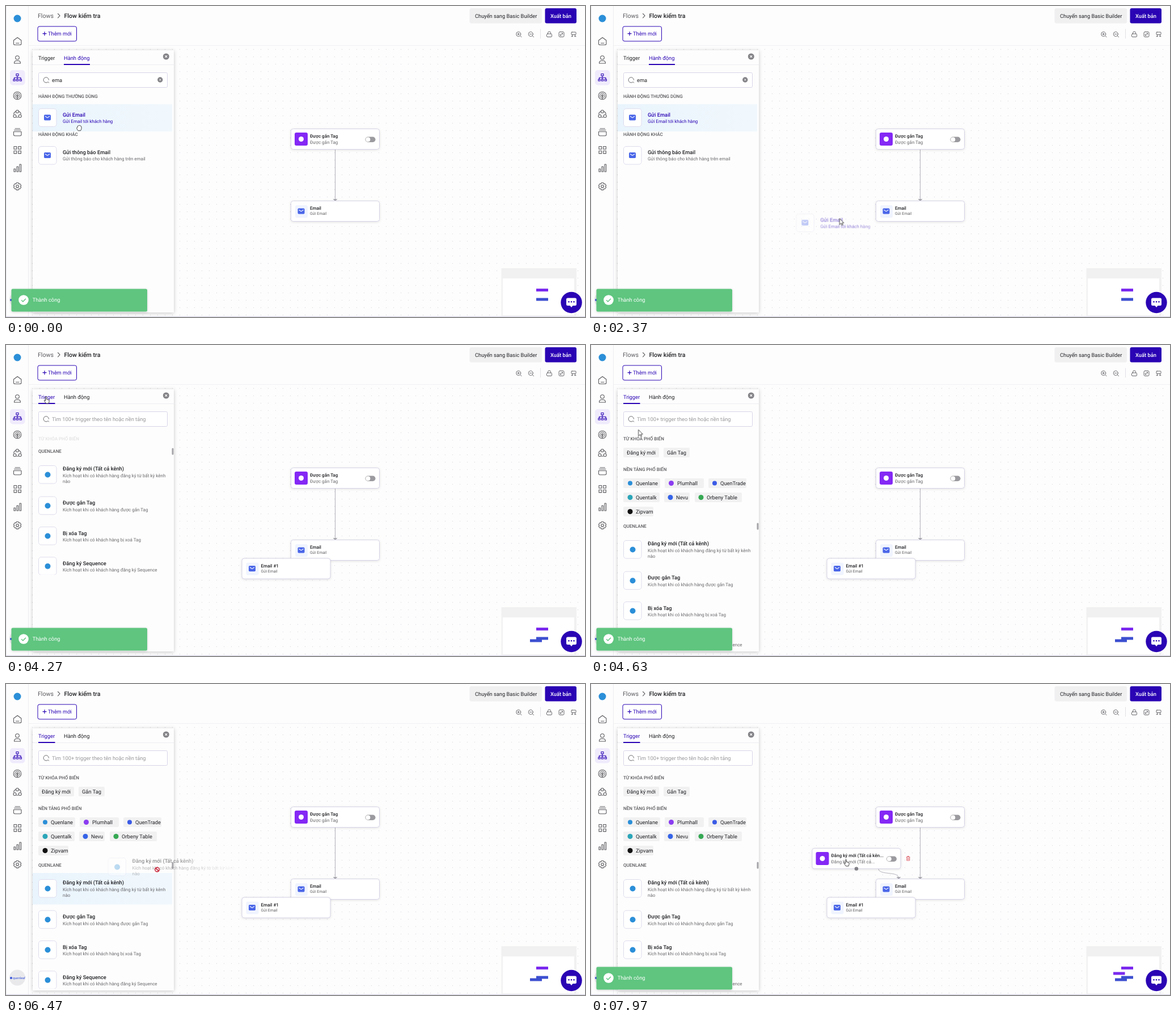
Recreate the animation shown at these times as an HTML page. Size 1021x548 px, loop 8 s.

```html
<!DOCTYPE html>
<html lang="vi">
<head>
<meta charset="utf-8">
<title>Flow builder</title>
<style>
html, body { margin: 0; width: 100%; height: 100%; overflow: hidden; background: #fdfdfd; }
svg { display: block; }
text { font: 9.31px Roboto, "Noto Sans", sans-serif; fill: #202124; text-rendering: geometricPrecision; }
.b { font-weight: 500; }
.s { font-size: 8px; fill: #6a6a6e; }
.xs { font-size: 6.85px; fill: #5c5c60; }
.n { font-size: 8px; font-weight: 500; }
.h { font-size: 8px; font-weight: 500; fill: #58585c; }
.v { fill: #2a04b4; }
.w { fill: #fff; }
.ph { fill: #98989c; }
.line { fill: none; stroke: #5b5b60; stroke-width: 1.1; stroke-linecap: round; stroke-linejoin: round; }
.tool { stroke-width: .9; }
.chip rect { fill: #f1f1f2; rx: 2px; }
.card { fill: #fff; stroke: #d6d4e6; filter: drop-shadow(0 1px 2px #0000001a); }
.edge { fill: none; stroke: #b1b1b9; }

/* hard switches */
.hover-a, .hover-b, .tab-a, .tab-b, .step1, .step2, .drag-a, .drag-b,
.grab, .hand, .arrow, .stop, .tint { animation: 8s step-end infinite; }
.hover-a { animation-name: hover-a; }
.hover-b { animation-name: hover-b; }
.tab-a { animation-name: tab-a; }
.tab-b { animation-name: tab-b; }
.step1 { animation-name: step1; }
.step2 { animation-name: step2; }
.drag-a { animation-name: drag-a; }
.drag-b { animation-name: drag-b; }
.grab { animation-name: grab; }
.hand { animation-name: hand; }
.arrow { animation-name: arrow; }
.stop { animation-name: stop; }
.tint { animation-name: tint; }
@keyframes hover-a { 0% { opacity: 1 } 34.375%, 100% { opacity: 0 } }
@keyframes hover-b { 0% { opacity: 0 } 63.5% { opacity: 1 } 88.75%, 100% { opacity: 0 } }
@keyframes tint { 0% { fill: #2a04b4 } 34.375% { } }
@keyframes tab-a { 0% { opacity: 1 } 52.5%, 100% { opacity: 0 } }
@keyframes tab-b { 0% { opacity: 0 } 52.5%, 100% { opacity: 1 } }
@keyframes step1 { 0% { opacity: 0 } 34.375%, 100% { opacity: 1 } }
@keyframes step2 { 0% { opacity: 0 } 88.75%, 100% { opacity: 1 } }
@keyframes drag-a { 0% { opacity: 0 } 18.125% { opacity: .5 } 34.375%, 100% { opacity: 0 } }
@keyframes drag-b { 0% { opacity: 0 } 71.25% { opacity: .5 } 88.75%, 100% { opacity: 0 } }
@keyframes grab { 0% { opacity: 1 } 7% { opacity: 0 } 34.375% { opacity: 1 } 40.5%, 100% { opacity: 0 } }
@keyframes hand {
  0% { opacity: 0 } 7% { opacity: 1 } 18.125% { opacity: 0 } 46% { opacity: 1 } 56% { opacity: 0 }
  62.5% { opacity: 1 } 71.25% { opacity: 0 } 88.75%, 100% { opacity: 1 }
}
@keyframes arrow {
  0% { opacity: 0 } 25.5% { opacity: 1 } 34.375% { opacity: 0 } 40.5% { opacity: 1 } 46% { opacity: 0 }
  56% { opacity: 1 } 62.5% { opacity: 0 } 82.2% { opacity: 1 } 88.75%, 100% { opacity: 0 }
}
@keyframes stop {
  0% { opacity: 0 } 18.125% { opacity: 1 } 25.5% { opacity: 0 } 71.25% { opacity: 1 } 82.2%, 100% { opacity: 0 }
}

/* motion */
.cursor { animation: cursor 8s ease-in-out infinite; }
@keyframes cursor {
  0%, 4% { transform: translate(129px, 215px) }
  14%, 18.125% { transform: translate(137px, 195px) }
  33%, 34.375% { transform: translate(477px, 402px); animation-timing-function: ease-in }
  39.625% { transform: translate(321px, 316px); animation-timing-function: ease-out }
  48.75%, 54% { transform: translate(72px, 97px) }
  66%, 67.2% { transform: translate(139px, 363px) }
  70%, 71.25% { transform: translate(144px, 365px); animation-timing-function: ease-in }
  80.875% { transform: translate(266px, 327px); animation-timing-function: ease-out }
  88%, 100% { transform: translate(451px, 315px) }
}
.toast { animation: toast 8s linear infinite; }
@keyframes toast {
  0%, 58.1% { transform: translate(0); opacity: 1; animation-timing-function: ease-in }
  0%, 38%, 60.6%, 92.5% { transform: translate(-249px); opacity: 0; animation-timing-function: cubic-bezier(.33, 1, .68, 1) }
  41.125%, 95.6%, 100% { transform: translate(0); opacity: 1 }
}
.expand { animation: expand 8s ease-in-out infinite; }
@keyframes expand {
  0%, 53.375% { transform: translateY(0) }
  56.5%, 100% { transform: translateY(132px) }
}
.fade { animation: fade 8s linear infinite; }
@keyframes fade { 0%, 52.8% { opacity: 0 } 56.5%, 100% { opacity: 1 } }
</style>
</head>
<body>
<svg width="1021" height="548" viewBox="0 0 1021 548">
<defs>
  <pattern id="dots" x="40" y="70" width="13" height="13" patternUnits="userSpaceOnUse">
    <circle cx="6.5" cy="6.5" r=".65" fill="#dadae4"/>
  </pattern>
  <linearGradient id="hoverFill">
    <stop stop-color="#e9f4fc"/><stop offset="1" stop-color="#f1f8fd"/>
  </linearGradient>
  <radialGradient id="spot" gradientUnits="userSpaceOnUse" cx="0" cy="0" r="150">
    <stop offset=".15" stop-color="#fff"/><stop offset="1" stop-color="#000"/>
  </radialGradient>
  <mask id="ghost" maskUnits="userSpaceOnUse" x="-150" y="-150" width="300" height="300">
    <circle r="150" fill="url(#spot)"/>
  </mask>
  <clipPath id="listClip"><rect x="47" y="176" width="249" height="229"/></clipPath>
  <clipPath id="keysClip"><rect class="expand" x="47" y="0" width="249" height="176"/></clipPath>
  <g id="mail">
    <rect x="-6" y="-5" width="12" height="10" rx="1.8" fill="#4a66e8"/>
    <path d="M-4 -2.3 L0 .4 L4 -2.3" fill="none" stroke="#fff" stroke-width="1.1"/>
  </g>
  <rect id="tile" x=".5" y=".5" width="31.5" height="31.5" rx="4.5" fill="#fff" stroke="#dddced"/>
  <g id="mailTile"><use href="#tile"/><use href="#mail" x="16" y="16"/></g>
  <g id="appTile"><use href="#tile"/><circle cx="16.5" cy="16.5" r="5" fill="#2b8fd8"/></g>
  <g id="appCard">
    <rect class="card" x=".5" y=".5" width="156" height="36" rx="4"/>
    <rect x="7" y="7" width="23" height="23" rx="3" fill="#8428f5"/>
    <circle cx="18.5" cy="18.5" r="4.5" fill="#fff"/>
    <rect x="131.500" y="14.500" width="18" height="9.500" rx="4.750" fill="#9b9b9f"/>
    <circle cx="136.300" cy="19.250" r="4" fill="#fff"/>
  </g>
  <g id="mailCard">
    <rect class="card" x=".5" y=".5" width="156" height="36" rx="4"/>
    <rect x="8" y="8" width="22" height="22" rx="3" fill="#f0f4fe"/>
    <use href="#mail" x="18.500" y="18.500"/>
  </g>
  <g id="close"><circle r="5.500" fill="#848488"/><path d="M-1.800 -1.800 L1.800 1.800 M1.800 -1.800 L-1.800 1.800" stroke="#fff" stroke-width="1.100"/></g>
  <path id="tip" d="M-4 -4 H4 L0 0Z" fill="#a9a9b1"/>
  <g id="field">
    <rect x="57.500" y="117.500" width="227" height="26" rx="2" fill="#fff" stroke="#d8d6e8"/>
    <path class="line tool" d="M75.500 130.300 a4.700 4.700 0 1 0 -1.400 3.400 l1.700 1.600"/>
  </g>
</defs>

<!-- canvas -->
<rect width="1021" height="548" fill="#fdfdfd"/>
<rect x="40" y="70" width="981" height="478" fill="url(#dots)"/>
<path d="M40 69.500 H1021" stroke="#f1f1f4"/>

<path class="edge" d="M580.500 253 V340"/>
<use href="#tip" x="580.500" y="344"/>
<g class="step2">
  <path class="edge" d="M507 326 C508 337 542 330 542 341"/>
  <use href="#tip" x="542.500" y="344"/>
</g>
<g transform="translate(502 216)">
  <use href="#appCard"/>
  <text class="n" x="34" y="16">Được gắn Tag</text>
  <text class="s" x="34" y="27">Được gắn Tag</text>
</g>
<g transform="translate(502 343)">
  <use href="#mailCard"/>
  <text class="n" x="34" y="16">Email</text>
  <text class="xs" x="34" y="25.300">Gửi Email</text>
</g>
<g class="step1">
  <g transform="translate(415.500 375.500)">
    <use href="#mailCard"/>
    <text class="n" x="34" y="16">Email #1</text>
    <text class="xs" x="34" y="25.300">Gửi Email</text>
  </g>
</g>
<g class="step2">
  <g transform="translate(389.500 289)">
    <use href="#appCard"/>
    <text class="n" x="34" y="16">Đăng ký mới (Tất cả kên...</text>
    <text class="s" x="34" y="27">Đăng ký mới (Tất cả...</text>
    <circle cx="78.500" cy="36.500" r="3.300" fill="#808086"/>
    <path d="M166.500 16 h6.500 M168.500 16 v-1.500 h2.500 v1.500 M167.300 16 v6 h5 v-6 M169 18 v2.500 M170.700 18 v2.500" fill="none" stroke="#dc5560" stroke-width=".9"/>
  </g>
</g>

<!-- minimap -->
<rect x="873.500" y="462" width="132.500" height="84" fill="#f1f1f2"/>
<rect x="876" y="480" width="126" height="65" fill="#fff"/>
<rect x="935" y="498" width="21" height="5" fill="#7a29ef"/>
<rect x="935" y="514.500" width="21" height="5" fill="#3c4fd0"/>
<rect class="step1" x="924" y="518.500" width="21" height="5" fill="#3c4fd0"/>
<rect class="step2" x="921" y="507.500" width="20.500" height="5" fill="#7a29ef"/>
<circle cx="997" cy="522.500" r="18.700" fill="#2a04b4"/>
<path d="M990.500 514.500 h13 q2.500 0 2.500 2.500 v8.500 q0 2.500 -2.500 2.500 h-4 l-2.500 3 l-2.500 -3 h-4 q-2.500 0 -2.500 -2.500 v-8.500 q0 -2.500 2.500 -2.500Z" fill="#fff"/>
<path d="M992.500 521.300 h.01 M997 521.300 h.01 M1001.500 521.300 h.01" stroke="#2a04b4" stroke-width="2.600" stroke-linecap="round"/>

<!-- header -->
<text x="56" y="20.700" style="font-size:10.64px;fill:#5b5b60">Flows</text>
<path class="line" d="M91.500 13.500 l3.500 3.700 l-3.500 3.700"/>
<text class="b" x="102.500" y="20.700" style="font-size:10.64px">Flow kiểm tra</text>
<rect x="817.500" y="4" width="127.500" height="26.500" rx="3" fill="#f0f0f1"/>
<text x="827" y="20.600">Chuyển sang Basic Builder</text>
<rect x="950.500" y="4" width="55.500" height="26.500" rx="3" fill="#2a04b4"/>
<text class="b w" x="960" y="20.600">Xuất bản</text>
<rect x="56" y="36" width="68.500" height="26" rx="3" fill="#fff" stroke="#2a04b4"/>
<path d="M64.500 48.700 h7 M68 45.200 v7" stroke="#2a04b4" stroke-width="1.200"/>
<text class="v" x="74" y="52">Thêm mới</text>
<g class="line tool">
  <circle cx="903.700" cy="49.500" r="4"/><path d="M906.700 52.500 l2.300 2.300 M902 49.500 h3.400 M903.700 47.800 v3.400"/>
  <circle cx="925.300" cy="49.500" r="4"/><path d="M928.300 52.500 l2.300 2.300 M923.600 49.500 h3.400"/>
  <path d="M942.500 41 V57" stroke="#dedee4"/>
  <rect x="953.500" y="49" width="9" height="5.500" rx="1.500"/><path d="M955.500 49 v-1.500 q0 -2.500 2.500 -2.500 t2.500 2.500 v1.500"/>
  <rect x="975" y="45.500" width="9" height="9" rx="2"/><path d="M980 48 h1.700 v1.700 M979 52 h-1.700 v-1.700 M981.500 48.200 l-4 3.600"/>
  <rect x="997" y="46" width="8" height="4.500" rx="1"/><path d="M998.500 50.500 v3 M1003.500 50.500 v3 M997 53.700 h2.500 M1002.500 53.700 h2.500"/>
</g>

<!-- sidebar -->
<rect width="39.500" height="548" fill="#fdfdfd"/>
<path d="M.5 0 V548 M39.500 0 V548" stroke="#ececf1"/>
<circle cx="20" cy="22" r="6.500" fill="#2b8fd8"/>
<rect x="7" y="113" width="26.500" height="26.500" rx="5" fill="#f0ebfc"/>
<g class="line">
  <path d="M13.500 60.500 l6.700 -5 l6.700 5 v6 q0 2 -2 2 h-9.400 q-2 0 -2 -2Z M17.500 65.500 h5.500"/>
  <circle cx="20" cy="91" r="3.300"/><path d="M14.500 101 q0 -4.500 4 -4.500 h3 q4 0 4 4.500Z"/>
  <g style="stroke:#2a04b4"><rect x="18" y="119.500" width="4" height="3.500"/><path d="M20 123 v6 M14.500 129 v-2.700 h11.500 v2.700"/><path d="M13 129 h3.200 v3 h-3.200Z M18.500 129 h3.200 v3 h-3.200Z M24.200 129 h3.200 v3 h-3.200Z"/></g>
  <circle cx="20" cy="158" r="6.800"/><circle cx="20" cy="158" r="4.200"/><circle cx="20" cy="158" r="1.600"/><path d="M20 158 v6.500"/>
  <circle cx="20" cy="186" r="2.500"/><circle cx="15.500" cy="194" r="2.500"/><circle cx="24.700" cy="194" r="2.500"/><path d="M16.500 186 q-2.700 1.800 -2.700 4.500 M23.500 186 q2.700 1.800 2.700 4.500 M18.500 196 h3"/>
  <path d="M16 216 h8.500 M14.500 218.800 h11.500 M13.500 221.500 h13.500 v5 q0 2.200 -2.200 2.200 h-9.100 q-2.200 0 -2.200 -2.200Z"/>
  <path d="M14 247.500 h4.700 v4.700 h-4.700Z M21.700 247.500 h4.700 v4.700 h-4.700Z M14 255.200 h4.700 v4.700 h-4.700Z M21.700 255.200 h4.700 v4.700 h-4.700Z"/>
  <path d="M14 287 h2.600 v5 h-2.600Z M19 283 h2.600 v9 h-2.600Z M24 279 h2.600 v13 h-2.600Z"/>
  <path d="M18.300 311.500 h3.600 l.7 2 l2.200 -.2 l1.900 3 l-1.300 1.500 l1.300 1.500 l-1.900 3 l-2.200 -.2 l-.7 2 h-3.600 l-.7 -2 l-2.200 .2 l-1.900 -3 l1.300 -1.500 l-1.300 -1.500 l1.900 -3 l2.200 .2Z"/><circle cx="20.100" cy="317.800" r="2.300"/>
</g>
<circle cx="20" cy="517.500" r="14" fill="#e9e9ec"/>
<circle cx="9" cy="518" r="2" fill="#3854d8"/>
<text x="12" y="520" style="font-size:5.700px;fill:#3854d8">quenleaf</text>

<!-- panel -->
<rect x="47" y="78" width="249" height="462" fill="#fdfdfd" style="filter:drop-shadow(0 1px 3px #00000038)"/>
<path d="M47 103.500 H296" stroke="#ededf2"/>
<use href="#close" x="282.300" y="89"/>
<use href="#field"/>

<g class="tab-a">
  <text x="57" y="94.700">Trigger</text>
  <text class="v" x="102" y="94.700">Hành động</text>
  <rect x="102" y="102" width="46" height="2" fill="#2a04b4"/>
  <text x="81" y="133.500">ema</text>
  <use href="#close" transform="translate(271.800 130) scale(.85)"/>
  <text class="h" x="57" y="162">HÀNH ĐỘNG THƯỜNG DÙNG</text>
  <rect class="hover-a" x="47" y="173" width="246" height="48" fill="url(#hoverFill)"/>
  <g id="rowA" transform="translate(57 180.500)">
    <use href="#mailTile"/>
    <text class="b tint" x="43" y="14">Gửi Email</text>
    <text class="s tint" x="43" y="25.300">Gửi Email tới khách hàng</text>
  </g>
  <text class="h" x="57" y="228.700">HÀNH ĐỘNG KHÁC</text>
  <g transform="translate(57 247)">
    <use href="#mailTile"/>
    <text class="b" x="43" y="14">Gửi thông báo Email</text>
    <text class="s" x="43" y="25.300">Gửi thông báo cho khách hàng trên email</text>
  </g>
</g>

<g class="tab-b">
  <text class="v" x="57" y="94.700">Trigger</text>
  <text x="102" y="94.700">Hành động</text>
  <rect x="57" y="102" width="29.500" height="2" fill="#2a04b4"/>
  <text class="ph" x="81" y="133.500">Tìm 100+ trigger theo tên hoặc nền tảng</text>

  <g clip-path="url(#keysClip)"><g class="fade chip">
    <text class="h" x="57" y="167.500">TỪ KHÓA PHỔ BIẾN</text>
    <rect x="57" y="181" width="63" height="17"/><text x="63" y="192.700">Đăng ký mới</text>
    <rect x="128" y="181" width="46" height="17"/><text x="134" y="192.700">Gắn Tag</text>
    <text class="h" x="57" y="221.500">NỀN TẢNG PHỔ BIẾN</text>
    <rect x="57" y="235" width="65" height="17"/><circle cx="69" cy="243.500" r="4" fill="#2b8fd8"/><text x="79" y="247">Quenlane</text>
    <rect x="130" y="235" width="69" height="17"/><circle cx="141.500" cy="243.500" r="4.500" fill="#8a3cf0"/><text x="152" y="247">Plumhall</text>
    <rect x="207" y="235" width="67" height="17"/><circle cx="218" cy="243.500" r="4" fill="#3b5be6"/><text x="228" y="247">QuenTrade</text>
    <rect x="57" y="260" width="64" height="17"/><circle cx="69" cy="268.500" r="4.500" fill="#2aa5b8"/><text x="79" y="272">Quentalk</text>
    <rect x="129" y="260" width="45" height="17"/><circle cx="140" cy="268.500" r="4.500" fill="#3563e8"/><text x="150" y="272">Nevu</text>
    <rect x="183" y="260" width="83" height="17"/><circle cx="194" cy="268.500" r="4.500" fill="#35a853"/><text x="204" y="272">Orbeny Table</text>
    <rect x="57" y="285" width="53" height="17"/><circle cx="69" cy="293.500" r="4.500" fill="#111"/><text x="79" y="297">Zipvam</text>
  </g></g>

  <g class="expand">
    <g clip-path="url(#listClip)">
      <text class="h" x="57" y="189.800">QUENLANE</text>
      <rect class="hover-b" x="47" y="201" width="246" height="55.500" fill="url(#hoverFill)"/>
      <g id="rowB" transform="translate(57 212)">
        <use href="#appTile"/>
        <text class="b" x="43" y="9.200">Đăng ký mới (Tất cả kênh)</text>
        <text class="s" x="43" y="20.700">Kích hoạt khi có khách hàng đăng ký từ bất kỳ kênh</text>
        <text class="s" x="43" y="31">nào</text>
      </g>
      <g transform="translate(57 266.700)">
        <use href="#appTile"/>
        <text class="b" x="43" y="14.500">Được gắn Tag</text>
        <text class="s" x="43" y="26">Kích hoạt khi có khách hàng được gắn Tag</text>
      </g>
      <g transform="translate(57 320)">
        <use href="#appTile"/>
        <text class="b" x="43" y="14.500">Bị xóa Tag</text>
        <text class="s" x="43" y="26">Kích hoạt khi có khách hàng bị xoá Tag</text>
      </g>
      <g transform="translate(57 373.300)">
        <use href="#appTile"/>
        <text class="b" x="43" y="14.500">Đăng ký Sequence</text>
        <text class="s" x="43" y="26">Kích hoạt khi có khách hàng đăng ký Sequence</text>
      </g>
    </g>
    <rect x="292.500" y="181.500" width="3" height="12" rx="1.500" fill="#a5a5a9"/>
  </g>
</g>

<path d="M0 547.300 H1021" stroke="#d2d0e2"/>

<g class="toast">
  <rect x="9.500" y="498.500" width="239.500" height="40" rx="2.500" fill="#5fc57f" style="filter:drop-shadow(0 1px 2px #0000002a)"/>
  <circle cx="31" cy="518" r="8.800" fill="#fff"/>
  <path d="M27.200 518.300 l2.700 2.700 l5 -5.300" fill="none" stroke="#5fc57f" stroke-width="1.400"/>
  <text class="w" x="46.700" y="521.300">Thành công</text>
</g>

<!-- pointer with the row being dragged -->
<g class="cursor">
  <g class="drag-a"><g mask="url(#ghost)"><use href="#rowA" x="-137" y="-195"/></g></g>
  <g class="drag-b"><g mask="url(#ghost)"><use href="#rowB" x="-144" y="-233"/></g></g>
  <g fill="#fff" stroke="#333" stroke-width=".9" stroke-linejoin="round">
    <path class="grab" d="M-4 -.5 q0 -1.200 1.200 -.8 V-3 q.2 -1.100 1.200 -.8 q.4 -1 1.400 -.5 q.7 -.7 1.500 .1 q1.500 -.3 1.700 1.200 q1 0 1 1 V1.500 L2.500 4.700 H-1.800 L-4 1.500Z"/>
    <path class="hand" d="M-2.500 -5.300 q1 -1.200 2 0 V-1.300 l3.500 .7 q1.100 .3 1.100 1.300 V3 l-1 2.900 H-1.500 L-4.600 1.600 q-.4 -1.100 .7 -1.200 l1.400 1Z"/>
    <path class="arrow" d="M-3 -6 V5 l2.600 -2.400 l1.700 3.600 l1.600 -.8 l-1.700 -3.400 H4.600Z"/>
    <g class="stop" stroke="#c4152c" stroke-width="1.500"><circle r="3.700"/><path d="M-2.600 -2.600 L2.600 2.600"/></g>
  </g>
</g>
</svg>
</body>
</html>
```
